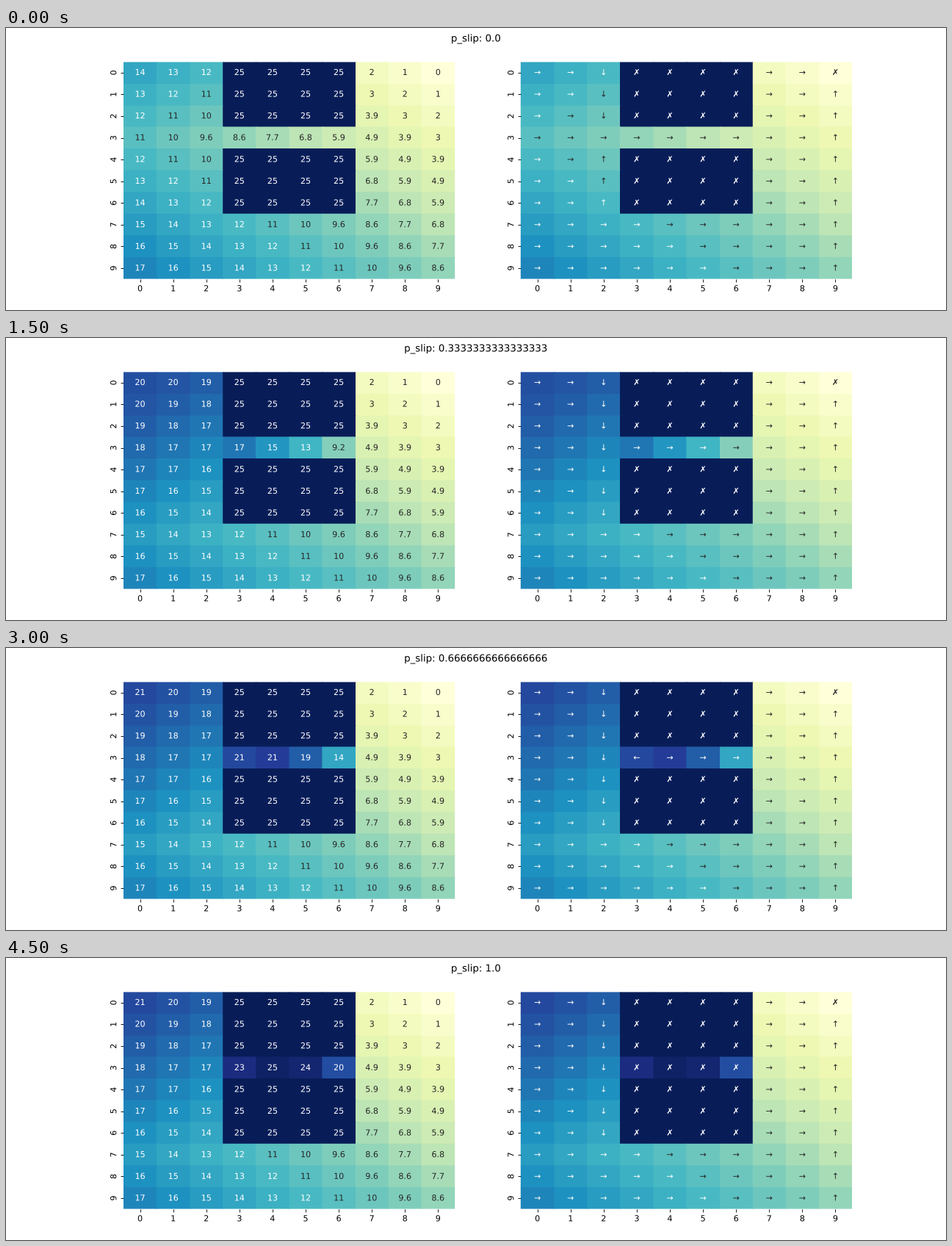
Recreate the animation shown at these times as a matplotlib script. Size 1280 by 384 pixels, loop 5000 ms.

```python
import numpy as np
import matplotlib.pyplot as plt
from matplotlib.animation import FuncAnimation
from matplotlib.collections import PolyCollection
from matplotlib.patheffects import Normal

SIZE, GAMMA, SWEEPS = 10, 0.99, 29
ARROWS = "✗→←↑↓"
MOVES = [(0, 0), (0, 1), (0, -1), (-1, 0), (1, 0)]
STEP = 0.8         # cells and baselines sit on a grid of this many pixels
OUTLINE = [Normal()]  # draws glyphs as outlines, free of whole-pixel rounding

rows, cols = np.indices((SIZE, SIZE))
middle = (cols >= 3) & (cols <= 6)
slippery = middle & (rows == 3)
walls = middle & (rows < 7) & ~slippery
goal = (rows == 0) & (cols == SIZE - 1)
absorbing = walls | goal


def neighbours(values):
    """Value reached by each move; walls and the goal are never left."""
    padded = np.pad(values, 1, mode="edge")
    shifted = [padded[1 + dr:1 + dr + SIZE, 1 + dc:1 + dc + SIZE]
               for dr, dc in MOVES]
    return np.where(absorbing, values, shifted)


def solve(p_slip):
    """Value iteration: expected cost and greedy move for every cell."""
    slip = np.where(slippery, p_slip, 0.0)
    cost = np.where(goal, 0.0, 1.0)

    def action_costs(values):
        reached = neighbours(values)
        return cost + GAMMA * ((1 - slip) * reached + slip * reached.mean(axis=0))

    values = np.zeros((SIZE, SIZE))
    for _ in range(SWEEPS):
        values = action_costs(values).min(axis=0)
    policy = np.round(action_costs(values), 9).argmin(axis=0)
    return values, policy


def text_color(rgba):
    rgb = rgba[:3]
    linear = np.where(rgb <= 0.03928, rgb / 12.92, ((rgb + 0.055) / 1.055) ** 2.4)
    return ".15" if linear @ [0.2126, 0.7152, 0.0722] > 0.408 else "w"


def snapped(cells, start, cell):
    """Positions in cell units, moved onto the pixel grid."""
    pixels = np.round((start + cell * cells) / STEP) * STEP
    return (pixels - start) / cell


def make_heatmap(ax):
    box = ax.bbox
    left, top = box.x0, fig.bbox.height - box.y1
    width, height = box.width / SIZE, box.height / SIZE
    xs = snapped(np.arange(SIZE + 1), left, width)
    ys = snapped(np.arange(SIZE + 1), top, height)

    # Each cell reaches one pixel under the next, so no seams show.
    x_ends = xs[1:] + np.append(np.full(SIZE - 1, 1 / width), 0)
    y_ends = ys[1:] + np.append(np.full(SIZE - 1, 1 / height), 0)
    quads = [[(x0, y0), (x1, y0), (x1, y1), (x0, y1)]
             for y0, y1 in zip(ys, y_ends) for x0, x1 in zip(xs, x_ends)]
    mesh = PolyCollection(quads, cmap="YlGnBu", edgecolors="none",
                          linewidths=0, snap=False, clip_on=False)
    ax.add_collection(mesh, autolim=False)

    ax.set(xlim=(0, SIZE), ylim=(SIZE, 0))
    ax.spines[:].set_visible(False)
    centers, names = np.arange(SIZE) + 0.5, [str(i) for i in range(SIZE)]
    ax.set_xticks(centers, names, va="baseline", path_effects=OUTLINE)
    ax.tick_params(axis="x", pad=11.5)
    ax.set_yticks(centers, names, rotation="vertical", va="center",
                  path_effects=OUTLINE)

    baselines = snapped(centers + 3.2 / height, top, height)
    labels = [ax.text(x, y, "", ha="center", va="baseline", path_effects=OUTLINE)
              for y in baselines for x in centers]
    return mesh, labels


def fill_heatmap(heatmap, values, strings):
    mesh, labels = heatmap
    mesh.set_array(values.ravel())
    mesh.set_clim(values.min(), values.max())
    colors = mesh.cmap(mesh.norm(values.ravel()))
    for label, string, rgba in zip(labels, strings, colors):
        label.set_text(string)
        label.set_color(text_color(rgba))


plt.rcParams["font.family"] = "DejaVu Sans"
fig, axes = plt.subplots(1, 2, figsize=(16, 4.8), dpi=80)
title = fig.suptitle("", y=1 - 18.4 / 384, va="baseline", path_effects=OUTLINE)
value_map, policy_map = [make_heatmap(ax) for ax in axes]
slips = np.linspace(0, 1, 10)
solutions = [solve(p) for p in slips]


def update(frame):
    values, policy = solutions[frame]
    title.set_text(f"p_slip: {float(slips[frame])}")
    fill_heatmap(value_map, values, [f"{v:.2g}" for v in values.ravel()])
    fill_heatmap(policy_map, values, [ARROWS[a] for a in policy.ravel()])


anim = FuncAnimation(fig, update, frames=len(slips), interval=500,
                     repeat=True, repeat_delay=0)
plt.show()
```
